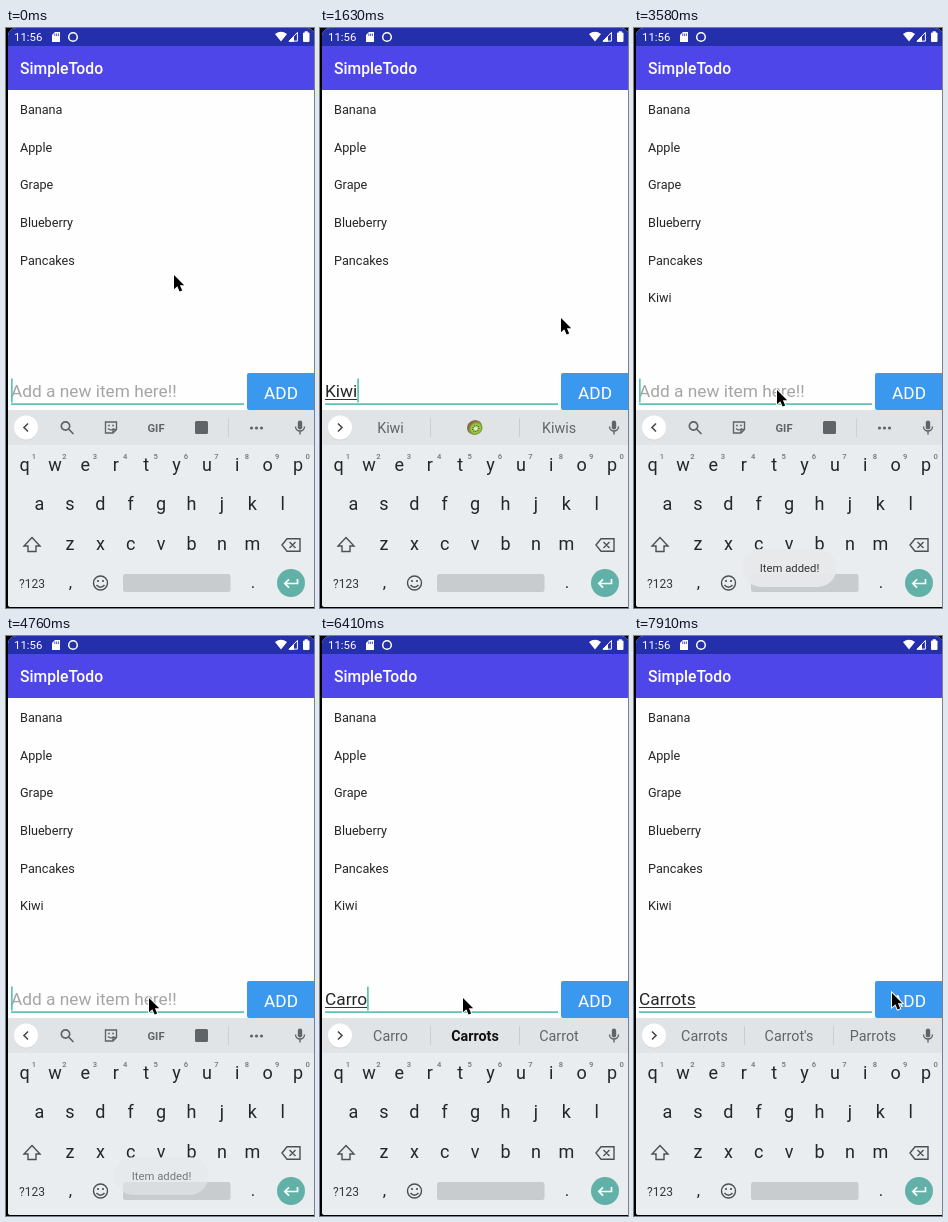
Recreate the animation shown at these times as an HTML page with a canvas. Size 308 px wide and 580 px high, loop 8 s.

```html
<!DOCTYPE html>
<html lang="en">
<head>
<meta charset="utf-8">
<title>Todo list</title>
<style>
html, body { margin: 0; width: 100%; height: 100%; overflow: hidden; background: #000; }
canvas { display: block; width: 308px; height: 580px; }
</style>
</head>
<body>
<canvas id="stage"></canvas>
<script>
const W = 308, H = 580, LOOP = 8000;
const canvas = document.getElementById('stage');
const ctx = canvas.getContext('2d');
const dpr = window.devicePixelRatio || 1;
canvas.width = W * dpr;
canvas.height = H * dpr;

const TEAL = '#5dc4b2', ICON = '#5f6468', KEY = '#23272a';
const HINT = 'Add a new item here!!';

// [time, text in the field]
const TYPED = [
  [0, ''], [300, 'K'], [890, 'Ki'], [1040, 'Kiw'], [1330, 'Kiwi'], [2680, ''],
  [5660, 'C'], [5810, 'Ca'], [6110, 'Car'], [6260, 'Carr'], [6410, 'Carro'],
  [6710, 'Carrot'], [7160, 'Carrots']
];
// [time, words]; a leading * marks the bold autocorrection
const HINTS = [
  [0, null], [450, ['K', 'Know', 'Keep']], [890, ['Ki', 'Kids', 'Kind']],
  [1040, ['Kiw', '*Kiwi', 'Kiwis']], [1330, ['Kiwi', kiwi, 'Kiwis']], [2830, null],
  [5660, ['C', 'Can', 'Can\'t']], [5810, ['Ca', 'Can', 'Can\'t']],
  [6110, ['Car', 'Care', 'Cars']], [6260, ['Carr', '*Carry', 'Carrot']],
  [6410, ['Carro', '*Carrots', 'Carrot']], [6710, ['Carrot', carrot, 'Carrots']],
  [7160, ['Carrots', 'Carrot\'s', 'Parrots']]
];
// [time, x, y] of the pointer tip
const POINTER = [
  [0, 168, 247], [1630, 241, 290], [1780, 258, 318], [1930, 266, 345], [2080, 269, 360],
  [2230, 269, 362], [2980, 262, 361], [3130, 230, 359], [3280, 185, 359], [3430, 151, 361],
  [3580, 143, 362], [7310, 165, 355], [7460, 205, 343], [7610, 240, 339],
  [7760, 254, 347], [7910, 258, 357]
];
const CARET_OFF = [[1930, 2380], [3130, 3580], [4030, 4470], [5060, 5510], [7610, LOOP]];
const PRESS = [[0, 0], [2530, 0.1], [2680, 0.14], [2830, 0.1], [2980, 0]];
const TOAST = [[0, 0], [2830, 0.5], [2980, 0.95], [4760, 0.6], [4910, 0.25], [5060, 0]];

const at = (steps, t) => steps.filter(s => s[0] <= t).pop();

function text(str, x, y, size, color, { weight = 400, align = 'left' } = {}) {
  ctx.font = `${weight} ${size}px Roboto, sans-serif`;
  ctx.textAlign = align;
  ctx.fillStyle = color;
  ctx.fillText(str, x, y);
  return ctx.measureText(str).width;
}

function rect(x, y, w, h, color, r = 0) {
  ctx.fillStyle = color;
  ctx.beginPath();
  ctx.roundRect(x, y, w, h, r);
  ctx.fill();
}

function disc(x, y, r, color) {
  ctx.fillStyle = color;
  ctx.beginPath();
  ctx.arc(x, y, r, 0, 7);
  ctx.fill();
}

function fillPath(d, x, y, color) {
  ctx.save();
  ctx.translate(x, y);
  ctx.fillStyle = color;
  ctx.fill(new Path2D(d));
  ctx.restore();
}

function line(d, x, y, color, width = 1.4) {
  ctx.save();
  ctx.translate(x, y);
  ctx.strokeStyle = color;
  ctx.lineWidth = width;
  ctx.stroke(new Path2D(d));
  ctx.restore();
}

const circle = r => `M${-r} 0a${r} ${r} 0 1 0 ${2 * r} 0a${r} ${r} 0 1 0 ${-2 * r} 0`;

function kiwi(x, y) {
  ctx.save();
  ctx.translate(x, y);
  ctx.rotate(-0.6);
  ctx.scale(1, 0.88);
  disc(0, -1, 7.8, '#8a6a42');
  disc(0.4, 1, 7, '#7fa83a');
  disc(0.4, 1, 5.4, '#9cc452');
  disc(0.4, 1, 2, '#e6ecb8');
  for (let i = 0; i < 9; i++) {
    const a = i * Math.PI / 4.5;
    disc(0.4 + 3.3 * Math.cos(a), 1 + 3.3 * Math.sin(a), 0.6, '#3f4a20');
  }
  ctx.restore();
}

function carrot(x, y) {
  fillPath('M-7 7Q-4-2 1-4Q5-3 4 0Q1 5-7 7z', x, y, '#f28a2c');
  line('M2-2L3-8M3-2L7-6M3-1L8-2', x, y, '#58a846', 2);
}

function statusBar() {
  rect(0, 0, W, 18, '#2430ab');
  text('11:56', 8, 13, 11.4, '#fff');
  fillPath('M-1-5H4V5H-4V-2z', 50, 9, '#fff');
  line('M-1.2-3.5V-1M.6-3.5V-1M2.4-3.5V-1', 50, 9, '#2430ab', 0.8);
  line(circle(4.3), 67, 9, '#fff', 1.5);
  fillPath('M0 5L-6-2.4Q0-7 6-2.4z', 275, 8.5, '#fff');
  line('M-4 4.4H4.4V-4.2z', 287, 8.7, '#fff', 1);
  fillPath('M-4.6 5L1-.8V5z', 287, 8.7, '#fff');
  rect(297, 4.5, 6.5, 9.5, '#fff', 1);
  rect(298.8, 3.2, 3, 2, '#fff');
}

function page(t) {
  rect(0, 0, W, H, '#fefefe');
  rect(0, 18, W, 44, '#4f46e9');
  statusBar();
  text('SimpleTodo', 14, 46, 15.7, '#fff', { weight: 500 });
  const items = ['Banana', 'Apple', 'Grape', 'Blueberry', 'Pancakes'];
  if (t >= 2830) items.push('Kiwi');
  items.forEach((s, i) => text(s, 14, 86 + i * 37.65, 12.65, '#252525'));
}

function field(t) {
  const typed = at(TYPED, t)[1];
  let end = 5;
  if (typed) {
    const w = text(typed, 5, 369, 17.3, '#252525');
    rect(5, 371, w, 1, '#333');
    end += w;
  } else {
    text(HINT, 5, 369, 17.3, '#a5a5a5');
  }
  rect(5, 375.3, 233, 1.7, TEAL);
  if (!CARET_OFF.some(([a, b]) => t >= a && t < b)) rect(end, 350.5, 1.7, 24, TEAL);

  rect(241, 345, 72, 37, '#3a98ef', 2);
  rect(241, 345, 72, 37, `rgba(255,255,255,${at(PRESS, t)[1]})`, 2);
  text('ADD', 275, 370.5, 17.3, '#fff', { align: 'center' });
}

function mic(x, y) {
  rect(x - 2.2, y - 7, 4.4, 9, ICON, 2.2);
  line('M-4.5-1a4.5 4.5 0 0 0 9 0M0 3.5V7', x, y, ICON, 1.4);
}

function toolbar() {
  line(circle(4.2) + 'M3 3L8 8', 59.5, 398, ICON, 1.7);
  line('M-5.5-5.5H5.5V2L2 5.5H-5.5zM5.5 2H2V5.5', 105, 399.5, ICON, 1.4);
  disc(103, 397.5, 0.9, ICON);
  disc(107, 397.5, 0.9, ICON);
  line('M-3 1Q0 4 3 1', 105, 399.5, ICON, 1.2);
  text('GIF', 150, 403.5, 11.2, ICON, { weight: 700, align: 'center' });
  rect(189, 393, 13, 13, ICON, 1.5);
  rect(222, 390, 1, 19, '#cdd1d4');
  for (const x of [245.5, 250.5, 255.5]) disc(x, 400, 1.6, ICON);
}

function suggestions(words) {
  rect(110, 390, 1, 19, '#c9cdd0');
  rect(199, 390, 1, 19, '#c9cdd0');
  words.forEach((word, i) => {
    const x = [70.5, 155, 239][i];
    if (typeof word === 'function') return word(x, 400);
    const bold = word[0] === '*';
    text(bold ? word.slice(1) : word, x, 405.3, 14.3, bold ? '#111' : ICON,
      { weight: bold ? 700 : 400, align: 'center' });
  });
}

function keyRow(keys, x, y) {
  [...keys].forEach((k, i) => text(k, x + i * 30.4, y, 18, KEY, { align: 'center' }));
}

function keyboard(t) {
  rect(0, 382, W, 198, '#e9edf0');
  rect(0, 382, W, 35, '#e1e4e7');
  const words = at(HINTS, t)[1];
  disc(20, 400.5, 12, '#d3d6d9');
  disc(20, 399.5, 12, '#fff');
  line(words ? 'M-2-4L2 0L-2 4' : 'M2-4L-2 0L2 4', 20, 399.5, '#45494c', 1.6);
  if (words) suggestions(words); else toolbar();
  mic(294, 399.5);

  keyRow('qwertyuiop', 18.5, 443);
  [...'1234567890'].forEach((d, i) =>
    text(d, 28 + i * 30.4, 430.5, 7.6, '#70757a', { weight: 500, align: 'center' }));
  keyRow('asdfghjkl', 33.5, 482);
  keyRow('zxcvbnm', 64, 522);

  line('M0-7L8 1.5H4V7H-4V1.5H-8z', 26, 516.5, '#4b5054', 1.4);
  line('M-9 0L-4-6.3H9V6.3H-4zM-1.5-3L4.5 3M4.5-3L-1.5 3', 285, 517, '#4b5054', 1.4);
  text('?123', 26, 559.5, 12, '#34383b', { align: 'center' });
  text(',', 64.5, 560, 17, KEY, { align: 'center' });
  text('.', 247, 560, 17, KEY, { align: 'center' });
  line(circle(7) + 'M-4 2Q0 6.5 4 2', 94.5, 555, '#4b5054', 1.4);
  disc(92, 553, 1.1, '#4b5054');
  disc(97, 553, 1.1, '#4b5054');
  rect(117, 546, 107.5, 18, '#c8cccf', 2.5);
  disc(285, 555, 14, '#62b1a8');
  line('M6.5-4.5V0H-6M-2-4.2L-6.2 0L-2 4.2', 285, 555.5, '#fff', 1.7);
}

function toast(t) {
  ctx.globalAlpha = at(TOAST, t)[1];
  rect(108.5, 521, 94, 38, '#e7e9eb', 19);
  text('Item added!', 155.5, 544, 11.3, '#2b2b2b', { align: 'center' });
  ctx.globalAlpha = 1;
}

function pointer(t) {
  const [, x, y] = at(POINTER, t);
  const arrow = 'M0 0V14.2L3.3 11.2L5.6 16.6L8.2 15.5L5.9 10.2H10.2z';
  line(arrow, x, y, '#fff', 1.8);
  fillPath(arrow, x, y, '#000');
}

function draw(now) {
  const t = now % LOOP;
  ctx.setTransform(dpr, 0, 0, dpr, 0, 0);
  rect(0, 0, W, H, '#000');
  ctx.save();
  ctx.beginPath();
  ctx.roundRect(2, 0, 307, 579, [8, 8, 3, 3]);
  ctx.clip();
  page(t);
  field(t);
  keyboard(t);
  toast(t);
  pointer(t);
  ctx.restore();
}

const start = performance.now();
function tick() {
  draw(performance.now() - start);
  requestAnimationFrame(tick);
}
tick();
</script>
</body>
</html>
```
